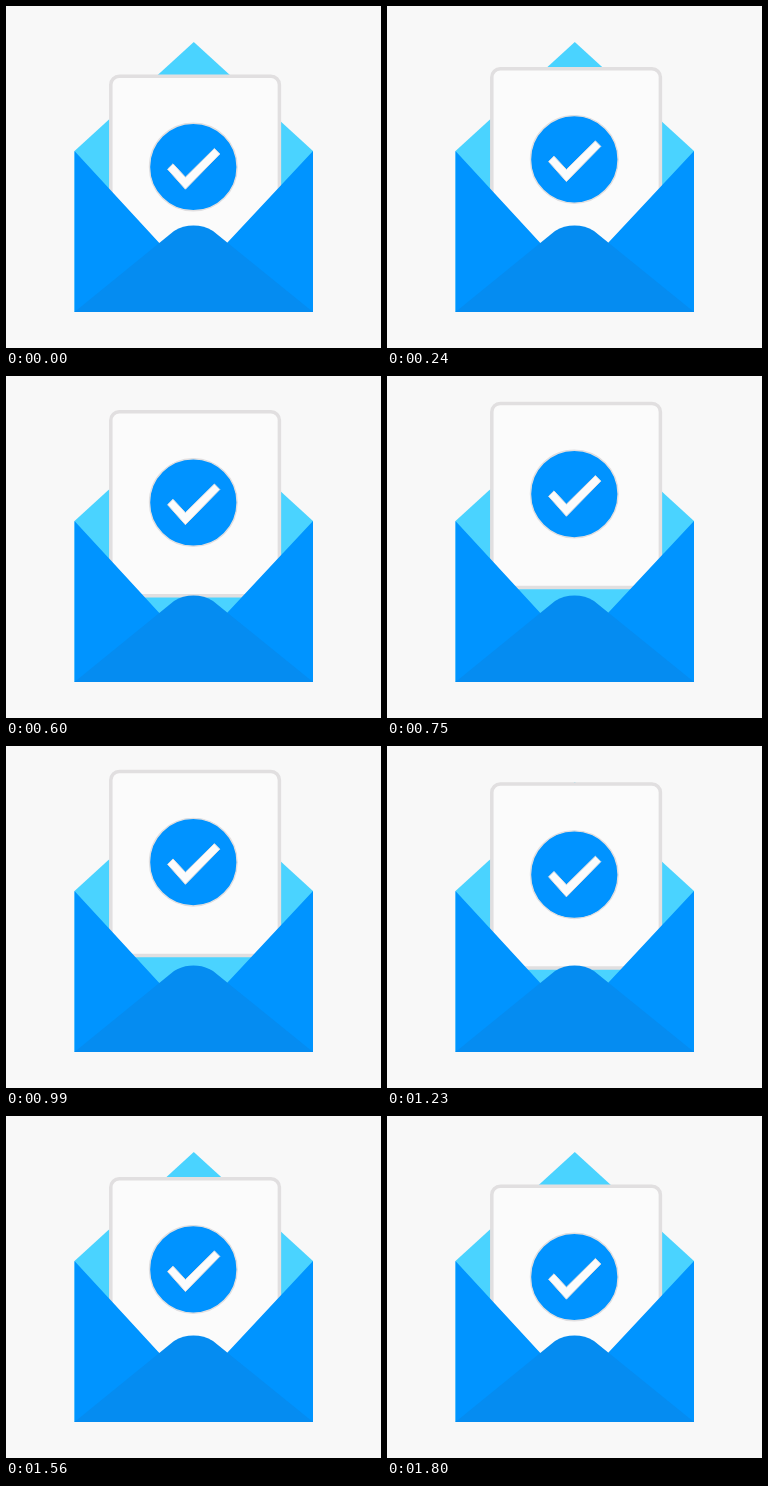
Recreate the animation shown at these times as an HTML page. Size 375 by 342 pixels, loop 1830 ms.

```html
<!DOCTYPE html>
<html lang="en">
<head>
<meta charset="utf-8">
<title>Envelope</title>
<style>
  html, body { margin: 0; width: 100%; height: 100%; overflow: hidden; background: #f8f8f8; }
  svg { display: block; width: 100vw; height: 100vh; }
</style>
</head>
<body>
<svg viewBox="0 0 375 342">
  <path fill="#4ad3ff" d="M68.5 145 187.8 36 307 145V306H68.5Z"/>
  <g id="letter">
    <rect x="104.8" y="70.3" width="168.6" height="184" rx="8.5" fill="#fbfbfb" stroke="#e1dfe0" stroke-width="3.5"/>
    <g stroke="#e1dfe0">
      <circle cx="187.3" cy="161" r="43.8" fill="#0093ff" stroke-width="1.4"/>
      <path fill="#fcfcfc" stroke-width="1" d="M161.6 163.2 167 157.8 179.4 171.2 208.4 142.5 213.8 148 179.4 183.2Z"/>
    </g>
  </g>
  <path fill="#0094ff" d="M68.5 145 153.3 237H221L307 145V306H68.5Z"/>
  <path fill="#058cf1" d="M68.5 306 168 225Q177 219.6 187.5 219.6T207 225L307 306Z"/>
</svg>
<script>
  const LOOP = 1830, SWING = 1800, STEP = 30, RISE = 46;
  const letter = document.getElementById('letter');

  function draw(now) {
    const t = Math.floor((now % LOOP) / STEP) * STEP;
    const lift = RISE * (1 - Math.cos(2 * Math.PI * t / SWING)) / 2;
    letter.setAttribute('transform', `translate(0 ${-lift.toFixed(2)})`);
    requestAnimationFrame(draw);
  }
  draw(0);
</script>
</body>
</html>
```
